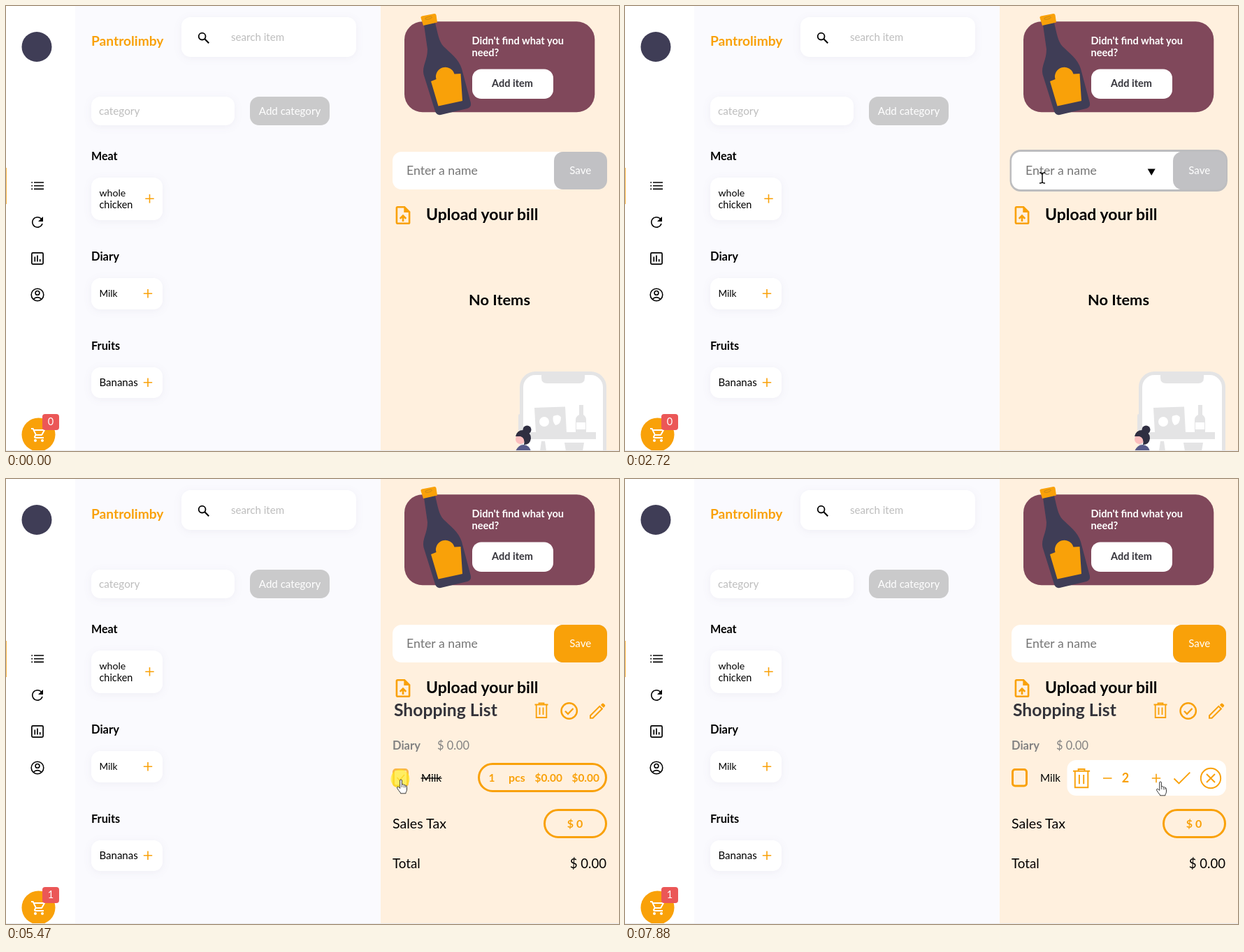
Recreate the animation shown at these times as an HTML page. Size 877 px wide and 638 px high, loop 8000 ms.

```html
<!DOCTYPE html>
<html lang="en">
<head>
<meta charset="utf-8">
<title>Shopping list</title>
<style>
  html, body { margin: 0; width: 100%; height: 100%; overflow: hidden; background: #fff; }
  svg { display: block; width: 877px; height: 638px; font-family: Lato, "Open Sans", sans-serif; }
  .soft { filter: drop-shadow(0 2px 6px rgba(60, 50, 110, .06)); }
  .pop { filter: drop-shadow(0 1px 2px rgba(0, 0, 0, .3)); }
  .ring { filter: blur(.7px); }
</style>
</head>
<body>
<svg id="stage" viewBox="0 0 877 638" xmlns="http://www.w3.org/2000/svg"></svg>
<script>
const LOOP = 8000;
const ORANGE = '#F9A109', DARK = '#3F3D56', INK = '#34333A', GREY = '#828282', PALE = '#E4E4E5';

// markup helpers
const rect = (x, y, w, h, r, fill, more = '') =>
  `<rect x="${x}" y="${y}" width="${w}" height="${h}" rx="${r}" fill="${fill}" ${more}/>`;
const circle = (x, y, r, fill, more = '') => `<circle cx="${x}" cy="${y}" r="${r}" fill="${fill}" ${more}/>`;
const path = (d, fill, more = '') => `<path d="${d}" fill="${fill}" ${more}/>`;
const line = (d, width = 2, color = ORANGE, more = '') =>
  `<path d="${d}" fill="none" stroke="${color}" stroke-width="${width}" ${more}/>`;
const text = (x, y, size, str, fill = '#000', weight = 400, anchor = 'start', more = '') =>
  `<text x="${x}" y="${y}" font-size="${size}" fill="${fill}" font-weight="${weight}" text-anchor="${anchor}" ${more}>${str}</text>`;
const group = (id, body) => `<g id="${id}">${body}</g>`;
const plus = (x, y) => line(`M${x - 6.2} ${y}h12.4M${x} ${y - 6.2}v12.4`, 1.6);
const soft = 'class="soft"';

const sidebar = () =>
  rect(0, 0, 99, 638, 0, '#fff') +
  rect(0, 232, 1, 52, 0, ORANGE, 'opacity=".75"') +
  circle(44, 58.5, 21.5, DARK) +
  [253, 257.7, 262.4].map(y => line(`M36.3 ${y}h1.8M40 ${y}h14`, 1.6, '#000')).join('') +
  path('M17.65 6.35A7.96 7.96 0 0 0 12 4c-4.42 0-8 3.58-8 8s3.58 8 8 8c3.73 0 6.84-2.55 7.73-6h-1.7A6.4 6.4 0 0 1 12 18.4c-3.5 0-6.4-2.9-6.4-6.4s2.9-6.4 6.4-6.4c1.8 0 3.3.7 4.5 1.9L13 11h7V4z',
    '#000', 'transform="translate(33 298)"') +
  rect(36.9, 353.9, 16.2, 16.2, 1.5, 'none', 'stroke="#000" stroke-width="1.7"') +
  line('M41.3 359.5v7M45 357.5v9M48.7 363v3.5', 1.7, '#000') +
  circle(45, 414, 8.8, 'none', 'stroke="#000" stroke-width="1.6"') +
  circle(45, 411.4, 2.9, 'none', 'stroke="#000" stroke-width="1.6"') +
  line('M39.3 420.3Q45 415 50.7 420.3', 1.6, '#000') +
  circle(46.5, 614.5, 24, ORANGE) +
  path('M15.55 13c.75 0 1.41-.41 1.75-1.03l3.58-6.49A1 1 0 0 0 20 4H5.21l-.94-2H1v2h2l3.6 7.59-1.35 2.44C4.52 15.37 5.48 17 7 17h12v-2H7l1.1-2zM6.16 6h12.15l-2.76 5H8.53zM7 18a2 2 0 1 0 0 4 2 2 0 0 0 0-4zm10 0a2 2 0 1 0 0 4 2 2 0 0 0 0-4z',
    '#fff', 'transform="translate(35 603)"') +
  rect(52, 585, 24, 23, 4, '#EB5757') +
  text(64, 600.5, 14.5, '0', '#fff', 400, 'middle', 'id="badge"');

const card = (y, h, lines, px) =>
  rect(122, y, 102, h, 13, '#fff', soft) +
  lines.map(([str, dy, size]) => text(133.5, y + dy, size, str)).join('') +
  plus(px, y + h / 2 - .3);

const catalogue = () =>
  rect(99, 0, 437, 638, 0, '#FAFAFE') +
  text(122, 57, 19.2, 'Pantrolimby', ORANGE, 700) +
  rect(251, 16, 250, 57, 13, '#fff', soft) +
  circle(280.6, 43.6, 4.9, 'none', 'stroke="#000" stroke-width="1.8"') +
  line('M284.3 47.3L290.2 53.2', 2.1, '#000') +
  text(322, 50, 15.1, 'search item', '#BDBDBD') +
  rect(122, 130, 205, 41, 13, '#fff', soft) +
  text(133, 155.5, 15.3, 'category', '#BDBDBD') +
  rect(349, 130, 114, 41, 13, '#CACACB') +
  text(406, 155.5, 15.1, 'Add category', '#fff', 400, 'middle') +
  text(122, 220.5, 16.1, 'Meat', '#000', 700) +
  text(122, 365, 16.5, 'Diary', '#000', 700) +
  text(122, 493, 16.3, 'Fruits', '#000', 700) +
  card(246, 61, [['whole', 26.5, 14.1], ['chicken', 43.5, 14.4]], 205.5) +
  card(390, 45, [['Milk', 27, 13.6]], 203) +
  card(518, 44, [['Bananas', 27, 15]], 203);

const banner = () =>
  rect(570, 22.3, 272.3, 130, 26, '#80485B') +
  path('M598 27L614 24C618 40 619 50 626 58C634 66 648 76 652 90L665 139Q666 145 660 147L622 156Q616 157 614 151L597.5 98C595 86 603 78 603 62Z', DARK) +
  path('M593.5 17Q593 15 595 14.5L613 11Q615 11 615.5 13L617 23.5L597 28Z', ORANGE) +
  line('M600 19Q599 17 602 16.3L608 15Q611 16 608 17.8Q604 20 600 19Z', 1, '#C98A1B') +
  path('M608 108L615.5 105A13.3 13.3 0 0 1 641.5 97.5L650.5 97L653 136L618.5 143.5Z', ORANGE) +
  text(666.5, 54.5, 14.6, 'Didn\'t find what you', '#fff', 700) +
  text(666.5, 72, 14.6, 'need?', '#fff', 700) +
  rect(667, 90.5, 116, 42.5, 13, '#fff') +
  text(724.5, 116, 14.5, 'Add item', INK, 700, 'middle');

const nameField = () =>
  group('ring', rect(552, 207.5, 308.5, 57, 14, '#BDBDBF', 'stroke="#BDBDBF" stroke-width="3" class="ring"')) +
  rect(553, 209, 250, 54, 13, '#fff') +
  rect(784, 209, 76, 54, 13, '#C1C1C4') +
  rect(784, 209, 76, 54, 13, ORANGE, 'id="saveOn"') +
  text(821.7, 241, 15.1, 'Save', '#fff', 400, 'middle') +
  text(573, 242, 17.7, 'Enter a name', '#757575', 400, 'start', 'id="hint"') +
  text(573, 242, 17.2, '', INK, 400, 'start', 'id="typed"') +
  rect(573.5, 227, 1.2, 18.5, 0, '#000', 'id="caret"') +
  path('M747.7 233.5h11l-5.5 9.5z', '#000', 'id="arrow"') +
  path('M14 2H6a2 2 0 0 0-2 2v16c0 1.1.89 2 2 2h12a2 2 0 0 0 2-2V8zm4 18H6V4h7v5h5zM8 15l1.4 1.4L11 14.84V19h2v-4.16l1.6 1.6L16 15l-4-4z',
    ORANGE, 'transform="translate(552.4 284.4) scale(1.3)"') +
  text(601, 307, 23, 'Upload your bill', '#000', 700);

const emptyState = () =>
  text(706, 428.5, 21.8, 'No Items', '#000', 700, 'middle') +
  rect(733, 585, 5, 24, 2, PALE) +
  rect(737.5, 526.5, 119, 150, 20, '#fff', `stroke="${PALE}" stroke-width="5"`) +
  path('M766 528h62v5q0 8-8 8h-46q-8 0-8-8z', PALE) +
  path('M756 576l44-1.5l2 37h-44z', PALE) +
  circle(770, 596, 7, '#fff') +
  path('M783 588q8-4 11 2q0 10-8 11q-5-6-3-13z', '#fff') +
  path('M820 572h6v14q4 3 4 7v19h-15v-19q0-4 5-7z', PALE) +
  rect(816, 597, 13, 10, 0, '#fff') +
  rect(745, 611, 99, 10, 0, PALE) +
  path('M766 624h5l2 14h-9zM799 626h28l-2 12h-24z', PALE) +
  path('M729 638Q733 629 741 629Q749 630 751 638Z', '#575A89') +
  circle(736, 621, 7, '#FBBEBE') +
  path('M729 617Q731 608 740 608Q751 610 751 620Q750 629 741 629Q743 619 736 617Z', '#2F2E41') +
  circle(745.5, 607.5, 6, '#2F2E41');

const trash = (x, y, scale, width) =>
  line('M0 3h19M6 3V.8h7V3M2.2 3v18.5h14.6V3M7 7v10.5M12 7v10.5', width, ORANGE,
    `transform="translate(${x} ${y}) scale(${scale})"`);

const list = () =>
  text(555, 340, 24.7, 'Shopping List', INK, 700) +
  trash(756.5, 320.5, 1, 1.8) +
  circle(805.7, 332.5, 11.2, 'none', `stroke="${ORANGE}" stroke-width="2.4"`) +
  line('M800 332.8L804 336.8L811.5 329', 2.3) +
  line('M836 342.7V339.2L849.3 325.9L852.9 329.5L839.6 342.7Z', 2) +
  path('M850.8 323.9L852.8 322Q853.9 321.1 855 322L856.8 323.7Q857.7 324.8 856.8 325.9L854.8 327.9Z', ORANGE) +
  text(553, 388, 16.5, 'Diary', GREY, 700) +
  text(617, 388, 16.4, '$ 0.00', GREY) +
  group('box', rect(554.5, 416.5, 20, 23.5, 3.5, 'none', `stroke="${ORANGE}" stroke-width="3"`) +
    line('M559.5 428L563 432L570 424', 1.6, ORANGE, 'id="tick"')) +
  text(594, 434, 15.2, 'Milk') +
  line('M593.5 429h30', 1.3, '#000', 'id="strike"') +
  group('pill', rect(676.5, 408.5, 182, 39, 19.5, 'none', `stroke="${ORANGE}" stroke-width="3"`) +
    text(695, 434, 15.5, '1', ORANGE, 700, 'middle') +
    text(719, 434, 16, 'pcs', ORANGE, 700) +
    text(756.5, 434, 15.4, '$0.00', ORANGE, 700) +
    text(809.5, 434, 15.4, '$0.00', ORANGE, 700)) +
  group('editor', rect(632.5, 403, 227.5, 51, 13, '#fff') +
    trash(641, 415, 1.27, 1.5) +
    line('M684 429h12.5', 1.6) +
    text(716, 435, 18, '1', ORANGE, 700, 'middle', 'id="count"') +
    plus(760, 429) +
    line('M785.5 429.5L792.5 436.5L808.3 420.7', 1.9) +
    circle(838, 429, 14.2, 'none', `stroke="${ORANGE}" stroke-width="1.9"`) +
    line('M832 423l12 12m0-12l-12 12', 1.9)) +
  text(553, 501, 19.6, 'Sales Tax') +
  rect(770.5, 474.5, 88, 39, 19.5, 'none', `stroke="${ORANGE}" stroke-width="3"`) +
  text(814, 499.5, 16, '$ 0', ORANGE, 700, 'middle') +
  text(553, 558, 18.8, 'Total') +
  text(859, 558, 18.6, '$ 0.00', '#000', 400, 'end');

const popup = () =>
  rect(644, 259, 178, 50, 7, '#fff', 'class="pop" id="menu"') +
  text(658, 289.5, 15, 'milk', INK) +
  group('more', text(658, 331.5, 15, 'whole chicken', INK) + text(658, 373.5, 15, 'bananas', INK));

const pointers = () =>
  circle(0, 0, 13.5, '#FFEB1F', 'id="flash" opacity=".65"') +
  path('M0 0V16.5L3.8 13L6.2 18.5L8.5 17.5L6.2 12.2H11.5Z', '#fff', 'id="tip" stroke="#000" stroke-width="1"') +
  line('M-4 -7.5Q0 -7.5 0 -5.5Q0 -7.5 4 -7.5M0 -6V6M-4 7.5Q0 7.5 0 5.5Q0 7.5 4 7.5', 1.4, '#000', 'id="beam"') +
  group('hand',
    path('M-.3 1.7Q1 .2 2.4 1.7V8Q4.5 7 5.3 8.7Q7 8 7.6 9.7Q9.5 9.3 9.5 11.5V15Q9.3 18 8 19.5V20.8H.5V20Q-2.5 16.5-4.5 13Q-4.5 10.5-2.3 11.5L-.3 13.5Z',
      '#fff', 'stroke="#3a3a3a" stroke-width="1"') +
    line('M2.4 8v4M5.3 9v3.5M7.6 10v2.5', .8, '#3a3a3a'));

const stage = document.getElementById('stage');
stage.innerHTML =
  sidebar() + catalogue() +
  rect(536, 0, 341, 638, 0, '#FFF0DE') +
  banner() + nameField() +
  group('empty', emptyState()) + group('list', list()) +
  rect(0, 637, 877, 1, 0, '#E9E9EB') +
  group('popup', popup()) + group('mouse', pointers());

const el = {};
stage.querySelectorAll('[id]').forEach(n => el[n.id] = n);
const show = (id, on) => { el[id].style.display = on ? '' : 'none'; };
const within = (t, ...spans) => spans.some(([a, b]) => t >= a && t < b);

// pointer moves: start, end, steps, from, to
const MOVES = [
  [70, 460, 7, [783, 519], [597, 246.5]],
  [3880, 4230, 6, [597, 246.5], [558, 426]],
  [5150, 5400, 4, [558, 426], [564, 430]],
  [5870, 6340, 7, [564, 430], [695, 433]],
  [6940, 7350, 7, [695, 433], [784, 431]],
  [7420, 7680, 4, [784, 431], [765, 433]]
];
const TYPED = [[1390, 'm'], [1590, 'mi'], [1790, 'mil'], [1920, 'milk'], [2720, '']];
const CLICKS = [[600, 740], [4620, 4820], [5470, 5610], [6540, 6610], [7750, 7880]];
const FOCUS = 600, LISTED = 2790;

function pointerAt(t) {
  let pos = MOVES[0][3];
  for (const [a, b, n, from, to] of MOVES) {
    if (t < a) break;
    const p = Math.min(1, (Math.floor((t - a) / (b - a) * (n - 1) + 1e-6) + 1) / n);
    pos = from.map((v, i) => v + (to[i] - v) * p);
  }
  return pos;
}

function draw(t) {
  const word = TYPED.filter(([at]) => t >= at).map(([, w]) => w).pop() || '';
  const focused = within(t, [FOCUS, LISTED]);
  const listed = t >= LISTED;
  const [x, y] = pointerAt(t);

  show('ring', focused);
  show('hint', !word);
  el.typed.textContent = word;
  show('caret', within(t, [FOCUS, 1130], [1390, 2450]));
  el.caret.setAttribute('x', 573.5 + (word ? el.typed.getComputedTextLength() : 0));
  el.saveOn.setAttribute('opacity', Math.max(0, Math.min(1, (t - LISTED) / 180)));

  show('popup', within(t, [670, 2720]));
  show('more', t < 1390);
  el.menu.setAttribute('height', t < 1390 ? 134 : 50);

  show('empty', !listed);
  show('list', listed);
  el.badge.textContent = listed ? 1 : 0;

  const checked = within(t, [4690, 5540]);
  show('tick', checked);
  show('strike', checked);
  el.box.setAttribute('opacity', within(t, [4230, 5940]) ? .7 : 1);

  const editing = t >= 6610;
  show('pill', !editing);
  show('editor', editing);
  el.count.textContent = t >= 7820 ? 2 : 1;

  const overField = within(t, [400, 3950]);
  const overLink = within(t, [4200, 5940], [6270, 6610], [7500, LOOP]);
  show('arrow', overField);
  show('mouse', t >= 70);
  el.mouse.setAttribute('transform', `translate(${x} ${y})`);
  show('flash', within(t, ...CLICKS));
  show('beam', overField);
  show('hand', overLink);
  show('tip', !overField && !overLink);
}

const start = performance.now();
function tick() {
  draw((performance.now() - start) % LOOP);
  requestAnimationFrame(tick);
}
tick();
</script>
</body>
</html>
```
